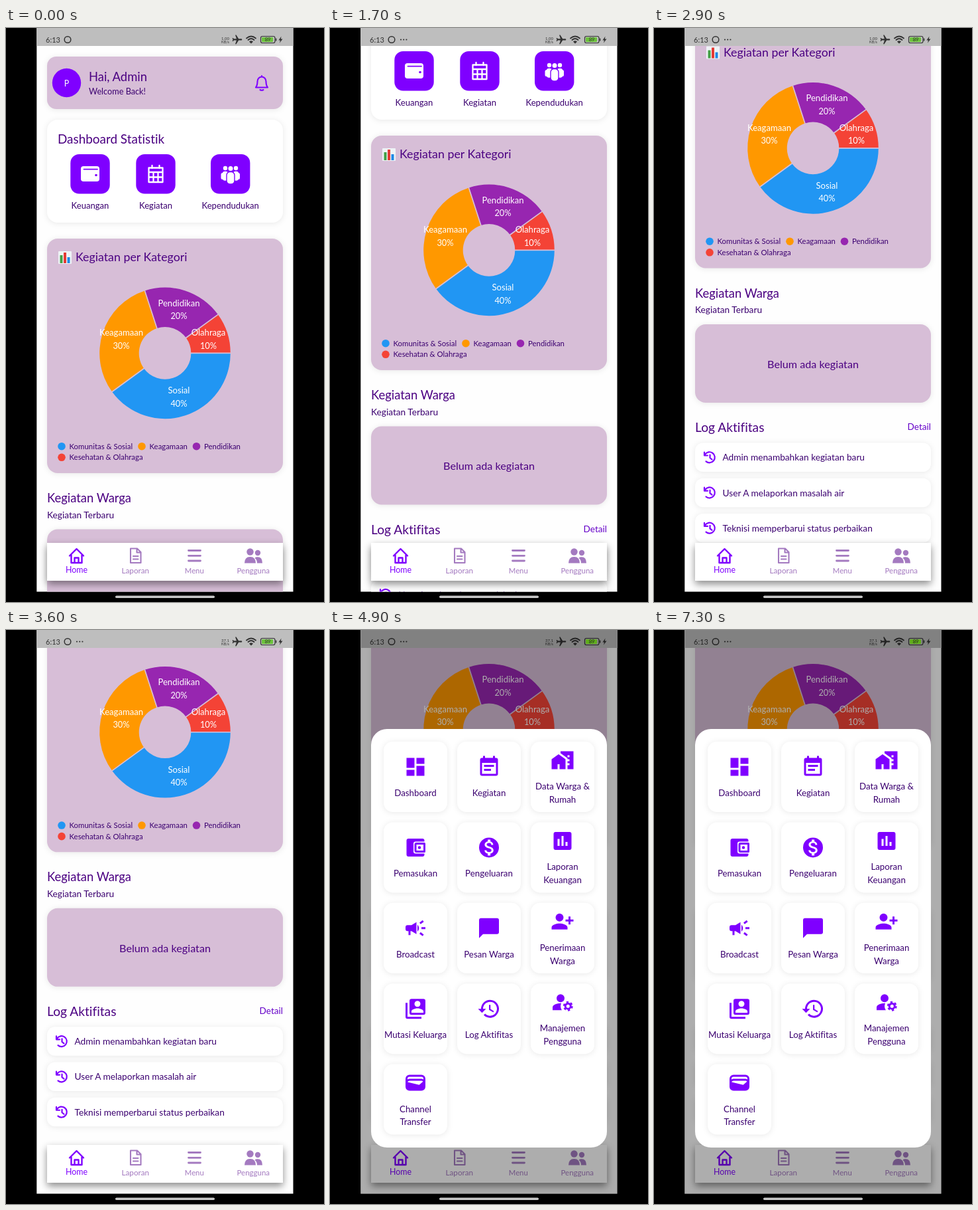
Animation of 480x864 px, one loop 7400 ms. Source, as an HTML page:

```html
<!DOCTYPE html>
<html lang="id">
<head>
<meta charset="utf-8">
<style>
html, body { margin: 0; width: 100%; height: 100%; overflow: hidden; background: #000; }
svg { display: block; }
text { font-family: Lato, "Open Sans", sans-serif; font-variant-ligatures: none; }
.soft { filter: drop-shadow(0 1px 4px rgba(0,0,0,.09)); }
.bar { filter: drop-shadow(0 5px 6px rgba(0,0,0,.45)); }
.line { fill: none; stroke-linecap: round; stroke-linejoin: round; }
</style>
</head>
<body>
<svg id="stage" width="480" height="864" viewBox="0 0 480 864"></svg>
<script>
const VIOLET = '#7f00ff', INDIGO = '#4b0082', DEEP = '#3b0070', LILAC = '#d7bed7', MUTED = '#a47ac0';
const LOOP = 7400, STEP = 100;
const SCREEN = { x: 46.3, w: 387.2, h: 848.5 };

const text = (s, x, y, size, fill = INDIGO, anchor = 'start') =>
  `<text x="${x}" y="${y + size * .36}" font-size="${size}" fill="${fill}" text-anchor="${anchor}">${s}</text>`;
const label = (s, x, y, size, fill) => text(s, x, y, size, fill, 'middle');
const box = (x, y, w, h, r, fill, cls = '') =>
  `<rect x="${x}" y="${y}" width="${w}" height="${h}" rx="${r}" fill="${fill}" class="${cls}"/>`;
const disc = (x, y, r, fill) => `<circle cx="${x}" cy="${y}" r="${r}" fill="${fill}"/>`;
const line = (d, color, width) => `<path class="line" d="${d}" stroke="${color}" stroke-width="${width}"/>`;
const shape = (d, fill) => `<path d="${d}" fill="${fill}" fill-rule="evenodd"/>`;
const group = (x, y, body, scale = 1) => `<g transform="translate(${x} ${y}) scale(${scale})">${body}</g>`;

// Icons on a 24-unit grid
const ICONS = {
  dashboard: 'M3 13h8V3H3zm0 8h8v-6H3zm10 0h8V11h-8zm0-18v6h8V3z',
  event: 'M17 10H7v2h10zM19 3h-1V1h-2v2H8V1H6v2H5a2 2 0 0 0-2 2v14a2 2 0 0 0 2 2h14a2 2 0 0 0 2-2V5a2 2 0 0 0-2-2zm0 16H5V8h14zm-5-5H7v2h7z',
  homes: 'M1 11v10h6v-5h2v5h6V11L8 6zM10 3v2l7 5v1h2v2h-2v2h2v2h-2v4h6V3zm9 6h-2V7h2z',
  income: 'M21 18v1a2 2 0 0 1-2 2H5a2 2 0 0 1-2-2V5a2 2 0 0 1 2-2h14a2 2 0 0 1 2 2v1h-9a2 2 0 0 0-2 2v8a2 2 0 0 0 2 2zM13 7h8a1 1 0 0 1 1 1v8a1 1 0 0 1-1 1h-8a2 2 0 0 1-2-2V9a2 2 0 0 1 2-2zm0 2v6h7V9zm3 1.5a1.5 1.5 0 1 1 0 3 1.5 1.5 0 0 1 0-3z',
  coin: 'M12 2a10 10 0 1 0 0 20 10 10 0 0 0 0-20zm1.41 16.09V20h-2.67v-1.93c-1.71-.36-3.16-1.46-3.27-3.4h1.96c.1 1.05.82 1.87 2.65 1.87 1.96 0 2.4-.98 2.4-1.59 0-.83-.44-1.61-2.67-2.14-2.48-.6-4.18-1.62-4.18-3.67 0-1.72 1.39-2.84 3.11-3.21V4h2.67v1.95c1.86.45 2.79 1.86 2.85 3.39H14.3c-.05-1.11-.64-1.87-2.22-1.87-1.5 0-2.4.68-2.4 1.64 0 .84.65 1.39 2.67 1.91s4.18 1.39 4.18 3.91c0 1.83-1.38 2.83-3.12 3.16z',
  report: 'M19 3H5a2 2 0 0 0-2 2v14a2 2 0 0 0 2 2h14a2 2 0 0 0 2-2V5a2 2 0 0 0-2-2zM9 17H7v-7h2zm4 0h-2V7h2zm4 0h-2v-4h2z',
  horn: 'M18 11v2h4v-2zm-2 6.6 3.2 2.4 1.2-1.6-3.2-2.4zM20.4 5.6 19.2 4 16 6.4 17.2 8zM4 9a2 2 0 0 0-2 2v2a2 2 0 0 0 2 2h1v4h2v-4h1l5 3V6L8 9zm11.5 3c0-1.3-.6-2.5-1.5-3.3v6.7c.9-.8 1.5-2 1.5-3.4z',
  chat: 'M20 2H4a2 2 0 0 0-2 2v18l4-4h14a2 2 0 0 0 2-2V4a2 2 0 0 0-2-2z',
  invite: 'M13 8a4 4 0 1 0-8 0 4 4 0 0 0 8 0zm2 2v2h3v3h2v-3h3v-2h-3V7h-2v3zM1 18v2h16v-2c0-2.7-5.3-4-8-4s-8 1.3-8 4z',
  family: 'M4 6H2v14a2 2 0 0 0 2 2h14v-2H4zM20 2H8a2 2 0 0 0-2 2v12a2 2 0 0 0 2 2h12a2 2 0 0 0 2-2V4a2 2 0 0 0-2-2zm-6 2a3 3 0 1 1 0 6 3 3 0 0 1 0-6zm6 12H8v-1.5c0-2 4-3 6-3s6 1 6 3z',
  history: 'M13 3a9 9 0 0 0-9 9H1l4 4 4-4H6a7 7 0 1 1 2.06 4.94l-1.42 1.42A9 9 0 1 0 13 3zm-1 5v5l4.28 2.54.72-1.21-3.5-2.08V8z',
  manage: 'M10 4a4 4 0 1 0 0 8 4 4 0 0 0 0-8zM10.7 13C8 12.9 5.5 13.5 3.4 14.8 2.5 15.3 2 16.3 2 17.3V20h9.3c-1.4-2-1.7-4.7-.6-7z',
  wallet: 'M18 4H6a4 4 0 0 0-4 4v8a4 4 0 0 0 4 4h12a4 4 0 0 0 4-4V8a4 4 0 0 0-4-4zm-1.9 9.8c-.2.2-.5.3-.9.2L4.15 11.25C4.45 10.5 5.2 10 6 10h12c.7 0 1.3.3 1.6.8zM6 6h12a2 2 0 0 1 2 2v.55A4 4 0 0 0 18 8H6a4 4 0 0 0-2 .55V8a2 2 0 0 1 2-2z',
  plane: 'M21 16v-2l-8-5V3.5a1.5 1.5 0 0 0-3 0V9l-8 5v2l8-2.5V19l-2 1.5V22l3.5-1 3.5 1v-1.5L13 19v-5.5z',
};
const icon = (name, cx, cy, size, fill = VIOLET) => {
  const gear = name === 'manage'
    ? `<circle cx="17.5" cy="16" r="2.7" fill="none" stroke="${fill}" stroke-width="2"/>
       <circle cx="17.5" cy="16" r="4.2" fill="none" stroke="${fill}" stroke-width="1.5" stroke-dasharray="2.2 2.2"/>` : '';
  return group(cx - size / 2, cy - size / 2, shape(ICONS[name], fill) + gear, size / 24);
};

function statusBar() {
  const ink = '#333';
  return box(SCREEN.x, 0, SCREEN.w, 27, 0, '#bebebe') +
    text('6:13', 60, 18.3, 11, ink) +
    `<circle cx="93" cy="17.5" r="4.8" fill="none" stroke="${ink}" stroke-width="1.5"/>` +
    `<g id="dots">${[107, 111.2, 115.4].map(x => disc(x, 17.5, 1.1, ink)).join('')}</g>` +
    `<g id="rate"></g>` + label('KB/s', 331, 21.5, 5.5, ink) +
    `<g transform="rotate(90 349 17.5)">${icon('plane', 349.3, 17.5, 17.5, ink)}</g>` +
    line('M363 15.5Q370 9.5 377 15.5M365.5 18Q370 14 374.5 18', ink, 1.8) +
    shape('M367 20.5Q370 18 373 20.5L370 23.5z', ink) +
    `<rect x="384.5" y="12.5" width="21.5" height="10" rx="2.5" fill="none" stroke="${ink}" stroke-width="1.2"/>` +
    `<rect id="charge" x="386" y="14" width="17" height="7" rx="1"/>` +
    label('89', 395, 17.5, 7.5, ink) + box(406.8, 15.5, 1.5, 4, .5, ink) +
    shape('M415.5 12.5 411.5 18.5H414L413 22.5 417.5 16.5H414.8z', ink);
}

function header() {
  return box(62, 43, 356, 79, 14, LILAC, 'soft') + disc(91.5, 82.5, 21.7, VIOLET) + label('P', 91.5, 83, 12.5, '#fff') +
    text('Hai, Admin', 125, 73.5, 18.4) + text('Welcome Back!', 125, 95, 12.7, DEEP) +
    line('M377 89.5Q379.5 86.5 379.5 80.5A6.5 7 0 0 1 392.5 80.5Q392.5 86.5 395 89.5zM386 73.5V72M383.5 93Q386 94.5 388.5 93', VIOLET, 2.1);
}

function statistics() {
  const tile = (x, name) => box(x - 29.7, 190, 59.4, 59.5, 13, VIOLET) + label(name, x, 267, 13.1, DEEP);
  const person = (x, y, r, w, h) => disc(x, y, r, '#fff') + box(x - w / 2, y + r + 1.5, w, h, w / 2.4, '#fff');
  return box(62, 138, 356, 155, 16, '#fff', 'soft') + text('Dashboard Statistik', 78, 167, 18.9) +
    tile(127, 'Keuangan') + tile(226, 'Kegiatan') + tile(338.7, 'Kependudukan') +
    box(113, 208, 28, 23, 4, '#fff') + line('M117.5 212.6H138', VIOLET, 1.8) + disc(136, 221.5, 1.8, VIOLET) +
    line('M215.5 210.5H236.5V232H215.5zM215.5 217H236.5M215.5 224.5H236.5M222.5 217V232M229.5 217V232M220.5 207V211M231.5 207V211', '#fff', 2.3) +
    person(331, 211, 3.2, 8, 14) + person(347, 211, 3.2, 8, 14) + person(327.5, 216.5, 0, 6, 10) + person(350, 216.5, 0, 6, 10) +
    `<rect x="333" y="216.5" width="12" height="18.5" rx="5" fill="#fff" stroke="${VIOLET}" stroke-width="1.4"/>` +
    disc(339, 211.5, 4.5, VIOLET) + disc(339, 211.5, 3.5, '#fff');
}

function pie() {
  const cx = 240, cy = 489.4, outer = 98.8, inner = 39.3;
  const at = (r, turn) => `${cx + r * Math.cos(turn * 2 * Math.PI)} ${cy + r * Math.sin(turn * 2 * Math.PI)}`;
  const slices = [
    ['Sosial', .4, '#2196f3', 261, 545.5], ['Keagamaan', .3, '#ff9800', 174, 458.5],
    ['Pendidikan', .2, '#9726b0', 261, 414], ['Olahraga', .1, '#f44336', 305.5, 458.5]];
  let turn = 0, wedges = '', gaps = '', labels = '';
  for (const [name, part, color, x, y] of slices) {
    const end = turn + part;
    wedges += shape(`M${at(outer, turn)}A${outer} ${outer} 0 0 1 ${at(outer, end)}L${at(inner, end)}A${inner} ${inner} 0 0 0 ${at(inner, turn)}z`, color);
    gaps += line(`M${at(inner, turn)}L${at(outer, turn)}`, LILAC, 1.7);
    labels += label(name, x, y, 13.1, '#fff') + label(part * 100 + '%', x, y + 19.7, 12.8, '#fff');
    turn = end;
  }
  const legend = (x, y, name, color) => disc(x, y, 5.8, color) + text(name, x + 11.5, y, 11.4, DEEP);
  const emoji = box(79, 336, 20, 19, 1, '#eef3f6') + box(81.5, 342, 4, 12, 0, '#43a047') +
    box(87, 338, 4, 16, 0, '#e53935') + box(92.5, 345, 4, 9, 0, '#1e88e5');
  return box(62, 317, 356, 353, 16, LILAC, 'soft') + emoji + text('Kegiatan per Kategori', 105, 345, 17.8) +
    wedges + gaps + labels +
    legend(84, 629.7, 'Komunitas &amp; Sosial', '#2196f3') + legend(205, 629.7, 'Keagamaan', '#ff9800') +
    legend(287.5, 629.7, 'Pendidikan', '#9726b0') + legend(84, 646.3, 'Kesehatan &amp; Olahraga', '#f44336');
}

function activity() {
  const logs = ['Admin menambahkan kegiatan baru', 'User A melaporkan masalah air', 'Teknisi memperbarui status perbaikan'];
  const row = (s, i) => {
    const y = 955 + i * 53.2;
    return box(62, y - 22, 356, 43.5, 12, '#fff', 'soft') + text(s, 103.5, y, 13.7, DEEP) +
      line(`M77 ${y - 4.5}A8 8 0 1 1 78.5 ${y + 5.8}M76 ${y - 8}V${y - 3}H81M84.5 ${y - 4}V${y + .5}L87.5 ${y + 3}`, VIOLET, 2.2);
  };
  return text('Kegiatan Warga', 62, 707.5, 18.4) + text('Kegiatan Terbaru', 62, 733, 13.7, DEEP) +
    box(62, 754.5, 356, 118, 16, LILAC, 'soft') + label('Belum ada kegiatan', 240, 814.5, 16.2) +
    text('Log Aktifitas', 62, 910, 19.2) + text('Detail', 418, 909, 13.6, '#6500c8', 'end') +
    logs.map(row).join('');
}

function navBar() {
  return box(62, 775, 356, 57, 0, '#fff', 'bar') +
    `<circle id="ripple" cx="284" cy="804" fill="#000" clip-path="url(#navClip)"/>` +
    line('M96 794.5 106.5 784 117 794.5M98.5 793V805H114.5V793M103.5 805V797.5H109.5V805', VIOLET, 2.4) +
    line('M188 783.5H198L203.5 789V805H188zM197.5 783.5V789.5H203.5M192 795H199.5M192 799.5H199.5', MUTED, 2.1) +
    line('M275.5 786.5H293.5M275.5 794.3H293.5M275.5 802H293.5', MUTED, 2.8) +
    disc(380, 790, 4.2, MUTED) + shape('M377 796.5Q387 794.5 387 805.5H379Q379 800 375.5 798z', MUTED) +
    disc(368.5, 788.5, 5.2, MUTED) + shape('M360 805.5Q360 796 368.5 796T377 805.5z', MUTED) +
    label('Home', 106.5, 816, 12.4, VIOLET) + label('Laporan', 195.3, 817, 11.7, MUTED) +
    label('Menu', 284.3, 817, 11.3, MUTED) + label('Pengguna', 373.3, 817, 11.5, MUTED);
}

function menuSheet() {
  const items = [
    ['dashboard', 'Dashboard'], ['event', 'Kegiatan'], ['homes', 'Data Warga &amp;', 'Rumah'],
    ['income', 'Pemasukan'], ['coin', 'Pengeluaran'], ['report', 'Laporan', 'Keuangan'],
    ['horn', 'Broadcast'], ['chat', 'Pesan Warga'], ['invite', 'Penerimaan', 'Warga'],
    ['family', 'Mutasi Keluarga'], ['history', 'Log Aktifitas'], ['manage', 'Manajemen', 'Pengguna'],
    ['wallet', 'Channel', 'Transfer']];
  const card = ([name, first, second], i) => {
    const x = 129 + (i % 3) * 111, y = 168 + Math.floor(i / 3) * 121.4, lift = second ? 10 : 0;
    return box(x - 48, y, 96, 106, 14, '#fff', 'soft') + icon(name, x, y + 38 - lift, 36) +
      label(first, x, y + 77.3 - lift, 13.3, DEEP) + (second ? label(second, x, y + 87, 13.3, DEEP) : '');
  };
  return box(62, 149, 356, 630, 24, '#fff') + items.map(card).join('');
}

const screen = (y, fill, id = '') =>
  `<rect id="${id}" x="${SCREEN.x}" y="${y}" width="${SCREEN.w}" height="${SCREEN.h - y}" fill="${fill}"/>`;

document.getElementById('stage').innerHTML = `
  <defs>
    <clipPath id="screenClip">${screen(0, '#000', 'whole')}</clipPath>
    <clipPath id="bodyClip">${screen(27, '#000', 'body')}</clipPath>
    <clipPath id="navClip"><rect x="62" y="775" width="356" height="57"/></clipPath>
  </defs>
  ${box(0, 0, 480, 864, 0, '#000')}${screen(0, '#fefefe', 'back')}
  <g clip-path="url(#bodyClip)"><g id="page">${header()}${statistics()}${pie()}${activity()}</g>${navBar()}</g>
  ${statusBar()}
  ${screen(0, '#000', 'dim')}
  <g clip-path="url(#screenClip)"><g id="sheet">${menuSheet()}</g></g>
  ${box(165, 854.5, 150, 3.6, 1.8, '#c8c8c8')}`;

const el = Object.fromEntries(['page', 'dots', 'rate', 'charge', 'ripple', 'dim', 'sheet'].map(id => [id, document.getElementById(id)]));
const progress = (t, from, to) => Math.min(1, Math.max(0, (t - from) / (to - from)));

const SCROLL = [[1100, 0], [1300, 15.3], [1700, 155], [2100, 244], [2900, 308.5], [3900, 339.5]];

// Monotone cubic through the scroll keys
function scrollAt(t) {
  const last = SCROLL.length - 1;
  if (t <= SCROLL[0][0]) return 0;
  if (t >= SCROLL[last][0]) return SCROLL[last][1];
  const slope = i => (SCROLL[i + 1][1] - SCROLL[i][1]) / (SCROLL[i + 1][0] - SCROLL[i][0]);
  const tangent = i => i === 0 || i === last ? 0 : 2 / (1 / slope(i - 1) + 1 / slope(i));
  const i = SCROLL.findIndex(([time]) => time > t) - 1;
  const [t0, y0] = SCROLL[i], [t1, y1] = SCROLL[i + 1], span = t1 - t0, u = (t - t0) / span;
  return y0 + (y1 - y0) * u * u * (3 - 2 * u) +
    span * u * (1 - u) * (tangent(i) * (1 - u) - tangent(i + 1) * u);
}

function render(t) {
  el.page.setAttribute('transform', `translate(0 ${-scrollAt(t)})`);
  el.dots.setAttribute('opacity', t >= 300 ? 1 : 0);
  el.rate.innerHTML = label(t < 3600 ? '1.00' : '37.1', 331, 15.5, 6, '#333');
  el.charge.setAttribute('fill', t < 4800 ? '#6cc23c' : '#8cff28');
  el.ripple.setAttribute('r', 34 * progress(t, 4250, 4500));
  el.ripple.setAttribute('opacity', .025 * (1 - progress(t, 4600, 4900)));
  const open = progress(t, 4550, 4800);
  el.dim.setAttribute('opacity', .32 * open);
  el.sheet.setAttribute('transform', `translate(0 ${700 * (1 - open) ** 3})`);
}

const start = performance.now();
function tick() {
  const t = (performance.now() - start) % LOOP;
  render(Math.floor(t / STEP) * STEP);
  requestAnimationFrame(tick);
}
tick();
</script>
</body>
</html>
```
